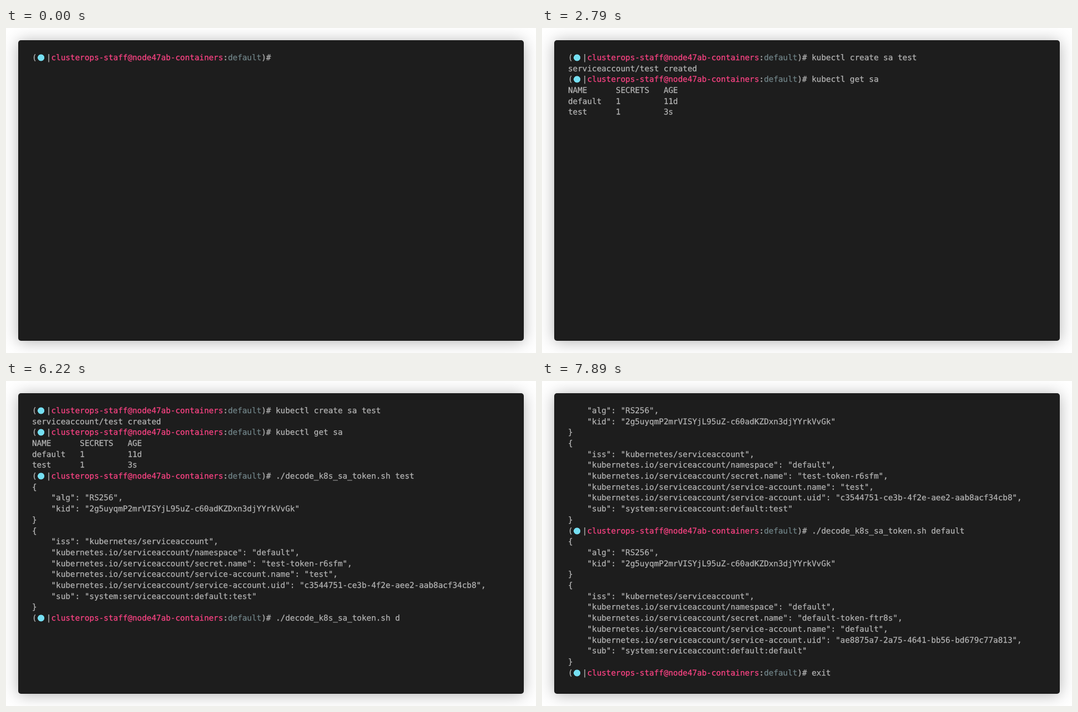
Recreate the animation shown at these times as an HTML page. Size 955 by 586 pixels, loop 8.01 s.

```html
<!DOCTYPE html>
<html lang="en">
<head>
<meta charset="utf-8">
<title>Service account tokens</title>
<style>
  html, body {
    margin: 0;
    width: 100%;
    height: 100%;
    overflow: hidden;
    background: #fff;
  }
  .window {
    position: absolute;
    left: 22px;
    top: 22px;
    width: 911px;
    height: 542px;
    border-radius: 5px;
    background: #1d1d1d;
    box-shadow: 0 2px 28px rgba(0, 0, 0, .3);
  }
  #screen {
    position: absolute;
    left: 25px;
    top: 22.8px;
    margin: 0;
    color: #b4b4b4;
    font: 14.3px/19.7px "DejaVu Sans Mono", monospace;
    text-rendering: geometricPrecision;
    font-variant-ligatures: none;
    -webkit-text-stroke: .25px;
  }
  .dot { background: radial-gradient(circle at 7.1px 7.5px, #75dff2 5.7px, transparent 6.3px); }
  .user { color: #fc4384; }
  .space { color: #708387; }
</style>
</head>
<body>
<div class="window"><pre id="screen"></pre></div>
<script>
  const LOOP = 8010;
  const ROWS = 25;
  const PROMPT = '(<span class="dot">  </span>|' +
    '<span class="user">clusterops-staff@node47ab-containers</span>:' +
    '<span class="space">default</span>)# ';

  const json = fields => '{\n' +
    fields.map(([key, value]) => `    "${key}": "${value}"`).join(',\n') + '\n}\n';

  const header = json([
    ['alg', 'RS256'],
    ['kid', '2g5uyqmP2mrVISYjL95uZ-c60adKZDxn3djYYrkVvGk'],
  ]);

  const claims = (name, suffix, uid) => {
    const base = 'kubernetes.io/serviceaccount/';
    return json([
      ['iss', 'kubernetes/serviceaccount'],
      [base + 'namespace', 'default'],
      [base + 'secret.name', `${name}-token-${suffix}`],
      [base + 'service-account.name', name],
      [base + 'service-account.uid', uid],
      ['sub', 'system:serviceaccount:default:' + name],
    ]);
  };

  const table = [['NAME', 'SECRETS', 'AGE'], ['default', '1', '11d'], ['test', '1', '3s']]
    .map(([name, secrets, age]) => name.padEnd(10) + secrets.padEnd(10) + age + '\n').join('');

  const create = 'kubectl create sa test';
  const decode = './decode_k8s_sa_token.sh ';

  // [time in ms, current input, output that follows it]
  const steps = [
    [0, ''],
    [1010, create],
    [1070, create, '\nserviceaccount/test created\n' + PROMPT],
    [1610, 'kub'],
    [1650, 'kube'],
    [1870, 'kubectl'],
    [2020, 'kubectl ge'],
    [2200, 'kubectl get'],
    [2420, 'kubectl get sa'],
    [2790, 'kubectl get sa', '\n' + table],
    [2830, '', PROMPT],
    [2930, './d'],
    [3150, decode],
    [3790, decode + 'te'],
    [4010, decode + 'test'],
    [4770, decode + 'test', '\n' + header],
    [4870, '', claims('test', 'r6sfm', 'c3544751-ce3b-4f2e-aee2-aab8acf34cb8') + PROMPT],
    [5890, decode + 'tes'],
    [6060, decode],
    [6220, decode + 'd'],
    [6420, decode + 'def'],
    [6590, decode + 'defau'],
    [6810, decode + 'default'],
    [7070, decode + 'default', '\n' + header],
    [7170, '', claims('default', 'ftr8s', 'ae8875a7-2a75-4641-bb56-bd679c77a813') + PROMPT],
    [7760, 'ex'],
    [7890, 'exit'],
  ];

  let log = PROMPT;
  const views = steps.map(([time, input, output = '']) => {
    const text = log + input + output;
    if (output) log = text;
    return { time, html: text.split('\n').slice(-ROWS).join('\n') };
  });

  const screen = document.getElementById('screen');
  let shown;

  function draw() {
    const time = performance.now() % LOOP;
    const view = views.findLast(v => v.time <= time);
    if (view !== shown) {
      screen.innerHTML = view.html;
      shown = view;
    }
    requestAnimationFrame(draw);
  }
  draw();
</script>
</body>
</html>
```
